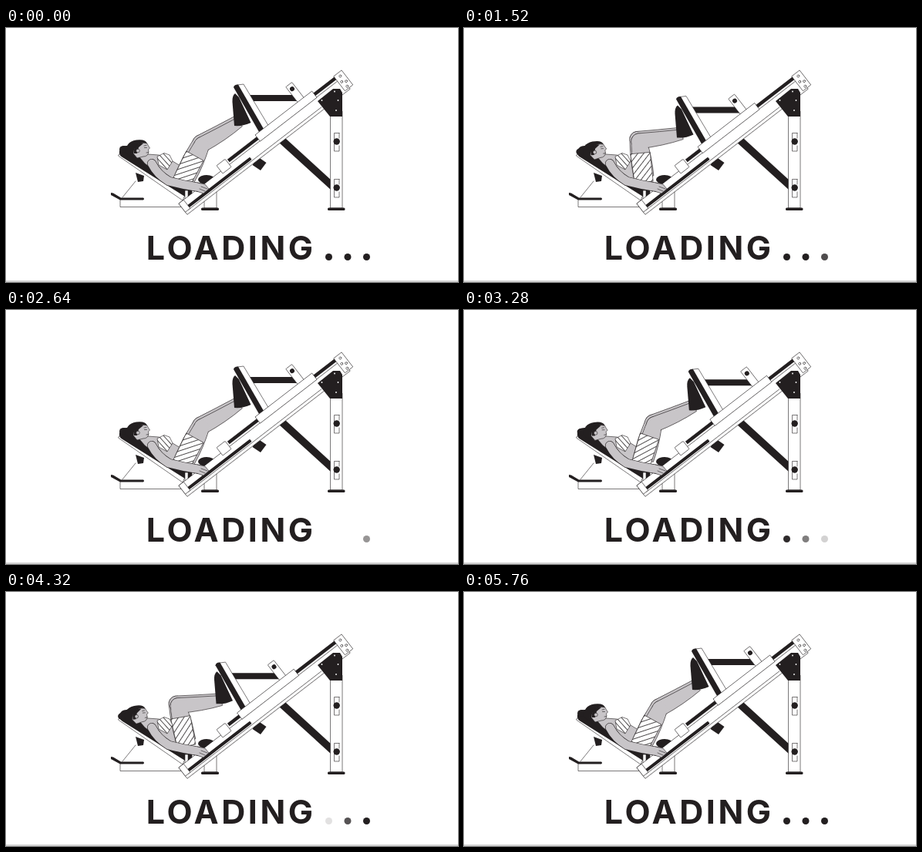
These frames come from a looping animation (586 by 330 pixels, 6000 ms). An HTML page:

```html
<!DOCTYPE html>
<html lang="en">
<head>
<meta charset="utf-8">
<title>Loading</title>
<style>
  html, body { margin: 0; width: 100%; height: 100%; overflow: hidden; background: #fff; }
  svg { display: block; width: 100%; height: 100%; }
  .w, .s { stroke: #231f20; stroke-width: .6; stroke-linejoin: round; }
  .w { fill: #fff; }
  .s { fill: #c8c5c8; }
  .k { fill: #231f20; }
  .l { fill: none; stroke: #231f20; stroke-width: .6; stroke-linecap: round; }
  .limb { fill: none; stroke-linecap: round; stroke-linejoin: round; }
  text { font: 700 43px Inter, "Open Sans", sans-serif; letter-spacing: 3.6px; fill: #231f20; }
</style>
</head>
<body>
<svg viewBox="0 0 586 330">
  <defs>
    <pattern id="stripes" width="6" height="6" patternUnits="userSpaceOnUse" patternTransform="rotate(45)">
      <rect width="6" height="6" fill="#fff"/>
      <rect y="2" width="6" height=".8" fill="#231f20"/>
    </pattern>
    <pattern id="bra" width="6" height="5" patternUnits="userSpaceOnUse" patternTransform="rotate(48)">
      <rect width="6" height="5" fill="#fff"/>
      <rect y="2" width="6" height=".8" fill="#231f20"/>
    </pattern>
  </defs>

  <!-- rear frame -->
  <path class="k" d="M354 149L362 143L422 198V211Z"/>
  <rect class="w" x="420.5" y="108" width="15.5" height="126"/>
  <g id="slot">
    <path class="l" d="M432 136.500H425.500V160H432V153M432 143V136.500"/>
    <circle class="k" cx="428.700" cy="147.500" r="4.200"/>
  </g>
  <use href="#slot" y="60"/>
  <rect class="k" x="417" y="233.500" width="22.500" height="3.500" rx="1.500"/>
  <path class="k" d="M326 167L337.500 175L330 185L319.500 178Z"/>

  <!-- sled parts behind the rail -->
  <g class="sled">
    <path class="k" d="M314 87H372L379 95H319Z"/>
    <g transform="translate(234 233) rotate(-37.700)">
      <rect class="w" x="197.500" y="-45" width="10" height="28" rx="1"/>
      <circle class="k" cx="202.500" cy="-38" r="3"/>
    </g>
    <path class="w" d="M300 74L308 73L342 130L333 136Z"/>
    <path class="k" d="M295 77Q296 73 301 73.500L334 131L328 135Z"/>
  </g>

  <!-- seat and base -->
  <path class="l" d="M168 199L151 220M148 223V232.500H232"/>
  <path class="k" d="M136 214L139 214.500L149 220.500H178Q180 222 178 223.500H148L136 217Z"/>
  <path class="k" d="M168 188L179 192L178 199L171 200Z"/>
  <rect class="w" x="257" y="200" width="16" height="34"/>
  <rect class="k" x="253" y="233.500" width="23" height="3.500" rx="1.500"/>
  <ellipse class="k" cx="260" cy="197" rx="11" ry="6"/>
  <path class="w" d="M145.500 166L148 162L232 217L229 224Z"/>
  <path class="k" d="M147 160Q149 152 158 153L182 167L240 203Q245 210 240 219L232 219L151 168Q146 165 147 160Z"/>
  <path class="w" d="M232 211H236V224H232ZM241 210H245V222H241Z"/>

  <!-- rail -->
  <g transform="translate(234 233) rotate(-37.700)">
    <rect class="w" x="-5" y="-10" width="267" height="18"/>
    <path class="l" d="M0 4H218"/>
    <rect class="k" x="0" y="-1.500" width="105" height="4" rx="1"/>
    <rect class="w" x="-5" y="-10" width="8" height="14"/>
    <rect class="k" x="80" y="-17" width="177" height="4.500"/>
    <rect class="w" id="bar" x="128" y="-20" width="93" height="10.500"/>
    <rect class="w" x="64" y="-19" width="14" height="13" rx="1"/>
    <rect class="w" x="255" y="-18" width="13" height="24"/>
    <circle class="l" cx="262" cy="-13" r="1.500"/>
    <circle class="l" cx="259" cy="-6" r="1.500"/>
    <circle class="l" cx="264" cy="-3" r="1.500"/>
    <circle class="l" cx="261" cy="3" r="1.500"/>
  </g>
  <path class="k" d="M404 95L424 79H433L436 84V115H420Z"/>
  <g fill="#fff">
    <circle cx="409.500" cy="94" r=".9"/><circle cx="426" cy="82.500" r=".9"/>
    <circle cx="430.500" cy="94" r=".9"/><circle cx="428" cy="107" r=".9"/>
  </g>

  <!-- athlete -->
  <path class="s" d="M168 162L184 164L198 165L216 173L234 184L240 202L226 208L196 188L180 176Z"/>
  <path class="w" d="M219 192L226 184L242 190L240 204L228 206Z"/>
  <g id="leg">
    <g class="thigh">
      <path class="s" d="M-4 -11Q20 -13 47 -10A10 10 0 0 1 47 10Q22 14 0 13Z"/>
    </g>
    <g class="calf">
      <path class="s" d="M0 -10Q28 -8 57 -6.500V6.500Q30 11 0 10A10 10 0 0 1 0 -10Z"/>
    </g>
    <g class="thigh">
      <path fill="#c8c5c8" d="M22 -11L45 -9.600A9.600 9.600 0 0 1 47 9.600L22 12Z"/>
    </g>
  </g>
  <use href="#leg" id="near" x="2" y="2.500"/>
  <g class="thigh">
    <path class="w" style="fill:url(#stripes)" d="M-9 -11L29 -11.500L28 14L-10 13Z"/>
  </g>
  <g class="sled">
    <path class="k" d="M297 85Q293 88 293.500 96L296 127Q307 128 317.500 123L302 90Z"/>
  </g>
  <path class="w" style="fill:url(#bra)" d="M196 167L205 162.500L212 165L216 173L209 184L198 178Z"/>
  <path class="limb" stroke="#231f20" stroke-width="12" d="M189 176Q196 190 211 199Q230 204 250 207"/>
  <path class="limb" stroke="#c8c5c8" stroke-width="10.800" d="M189 176Q196 190 211 199Q230 204 250 207"/>
  <path class="s" d="M248 201L258 203L263 209L256 215L247 212"/>
  <path class="l" d="M251 209L258 212M253 206L261 209"/>

  <g id="head">
    <ellipse class="k" cx="152.500" cy="157.500" rx="5.500" ry="4.500"/>
    <path class="k" d="M156 162Q154 148 169 145.500Q181 144 183 150L177 162L168 168Q160 168 156 162Z"/>
    <path class="s" d="M171 151Q178 148 183 150L184.500 153L186.500 156L184.500 158L185 161Q184 167 178 167L170 169L165 163Q166 155 171 151Z"/>
    <path class="k" d="M166 163Q165 151 174 149.500L178 150L172 155L170 163Z"/>
    <circle class="s" cx="171" cy="159.500" r="2.300"/>
    <path class="l" d="M179 153L182 152.500M179.500 155.500H182.500M182 162L184.500 161.500"/>
  </g>

  <text x="291.800" y="301.300" text-anchor="middle">LOADING</text>
  <g class="k" id="dots">
    <circle cx="418.500" cy="297.500" r="4.500"/>
    <circle cx="443" cy="297.500" r="4.500"/>
    <circle cx="467.500" cy="297.500" r="4.500"/>
  </g>
  <rect y="328.500" width="586" height="1" fill="#aaa"/>
</svg>
<script>
  const LOOP = 6000, STEP = 80;
  const PRESS = 3000, LOWERED = 1050, RAISED = 2600;
  const SLOPE = 37.7 * Math.PI / 180, TRAVEL = 32;
  const HIP = { x: 231, y: 191 }, ANKLE = { x: 299.500, y: 120.500 };
  const THIGH = 47, CALF = 55.300;
  const DOT_CYCLE = 2000;
  const FADE_OUT = [0, 235, 445], FADE_IN = [900, 1050, 1200];

  const all = q => [...document.querySelectorAll(q)];
  const sleds = all('.sled'), thighs = all('.thigh'), calf = all('.calf')[0];
  const bar = document.getElementById('bar'), head = document.getElementById('head');
  const dots = [...document.getElementById('dots').children];

  const clamp = v => Math.min(1, Math.max(0, v));
  const ease = v => (1 - Math.cos(Math.PI * clamp(v))) / 2;
  const deg = a => a * 180 / Math.PI;
  const place = (el, x, y, a = 0) =>
    el.setAttribute('transform', `translate(${x} ${y}) rotate(${deg(a)})`);

  // 0 = legs extended, 1 = sled fully lowered
  const depth = p => p < LOWERED
    ? ease(p / LOWERED)
    : 1 - ease((p - LOWERED) / (RAISED - LOWERED));

  function bendLeg(x, y) {
    const dx = x - HIP.x, dy = y - HIP.y;
    const d = Math.min(Math.hypot(dx, dy), THIGH + CALF - .01);
    const cosHip = (THIGH ** 2 + d ** 2 - CALF ** 2) / (2 * THIGH * d);
    const a = Math.atan2(dy, dx) - Math.acos(cosHip);
    const kx = HIP.x + THIGH * Math.cos(a), ky = HIP.y + THIGH * Math.sin(a);
    thighs.forEach(el => place(el, HIP.x, HIP.y, a));
    place(calf, kx, ky, Math.atan2(y - ky, x - kx));
  }

  function draw(t) {
    const k = depth(t % PRESS);
    const x = -TRAVEL * k * Math.cos(SLOPE), y = TRAVEL * k * Math.sin(SLOPE);
    sleds.forEach(el => place(el, x, y));
    place(bar, -TRAVEL * k, 0);
    bendLeg(ANKLE.x + x, ANKLE.y + y);
    head.setAttribute('transform', `translate(${-1.500 * k} ${2.500 * k}) rotate(${-5 * k} 170 165)`);

    const p = t % DOT_CYCLE;
    dots.forEach((dot, i) => dot.setAttribute('opacity',
      p < 850 ? 1 - clamp((p - FADE_OUT[i]) / 370) : clamp((p - FADE_IN[i]) / 400)));
  }

  const start = performance.now();
  function tick() {
    const t = (performance.now() - start) % LOOP;
    draw(Math.floor(t / STEP) * STEP);
    requestAnimationFrame(tick);
  }
  tick();
</script>
</body>
</html>
```
